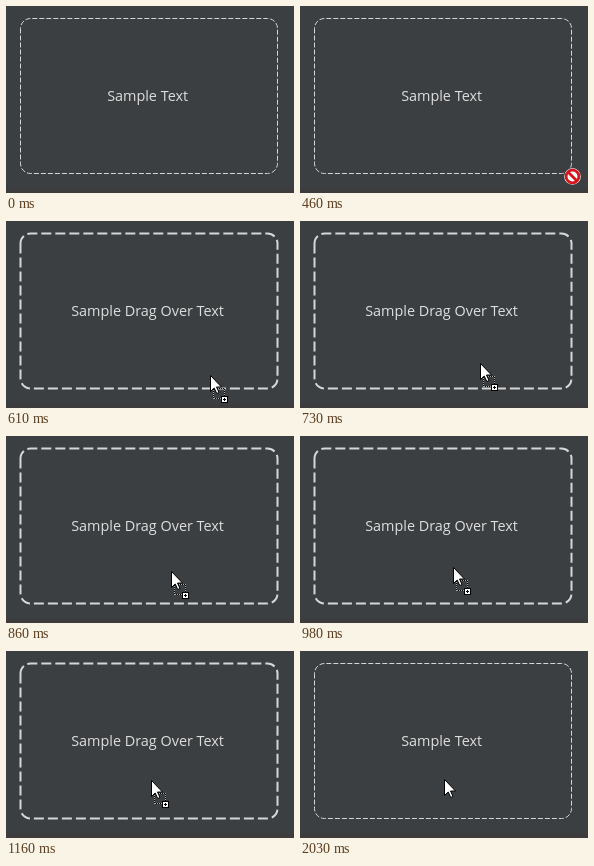
Recreate the animation shown at these times as an HTML page. Size 288 px wide and 187 px high, loop 2530 ms.

```html
<!DOCTYPE html>
<html lang="en">
<head>
<meta charset="utf-8">
<title>Drop zone</title>
<style>
  html, body { margin: 0; width: 100%; height: 100%; overflow: hidden; background: #3c3f41; }
  svg { display: block; width: 288px; height: 187px; }
  text { font: 14.4px "Open Sans", "Noto Sans", sans-serif; fill: #dedede; text-anchor: middle; }
  .zone { fill: none; stroke: #d6d6d6; }
  .hidden { display: none; }
</style>
</head>
<body>
<svg viewBox="0 0 288 187">
  <defs>
    <path id="frame" d="M14.5 22.5 V157.5 a10 10 0 0 0 10 10 H261.5 a10 10 0 0 0 10 -10 V22.5 a10 10 0 0 0 -10 -10 H24.5 a10 10 0 0 0 -10 10 Z"/>
    <path id="arrow" fill="#fff" stroke="#000" d="M.5 .5 V16.5 L4.2 13 L6.8 18.5 L9 17.5 L6.5 12 H11.5 Z"/>
  </defs>

  <rect width="288" height="187" fill="#3c3f41"/>
  <rect y="183" width="288" height="4" fill="#3d3b3c"/>

  <g id="idle">
    <use href="#frame" class="zone" stroke-dasharray="5 2"/>
    <text x="141.6" y="95">Sample Text</text>
  </g>
  <g id="over">
    <use href="#frame" class="zone" stroke-width="2" stroke-dasharray="10 4"/>
    <text x="141.6" y="95">Sample Drag Over Text</text>
  </g>

  <g id="cursor">
    <g id="blocked">
      <circle cx=".5" cy=".5" r="8.3" fill="#fff"/>
      <g fill="none" stroke="#d8121a" stroke-width="2.8">
        <circle cx=".5" cy=".5" r="6.4"/>
        <path d="M-4 -4 L5 5"/>
      </g>
    </g>
    <g id="drag">
      <g fill="none" stroke-dasharray="1 1">
        <path stroke="#000" d="M4 14.5 H16 M15.5 15 V25 M4 24.5 H16 M4.5 15 V25"/>
        <path stroke="#a8a8a8" stroke-dashoffset="1" d="M4 14.5 H16 M15.5 15 V25 M4 24.5 H16 M4.5 15 V25"/>
      </g>
      <rect x="12.5" y="22.5" width="6" height="6" fill="#fff" stroke="#000"/>
      <path d="M14 25.5 H17 M15.5 24 V27" stroke="#000"/>
      <use href="#arrow" x="1" y="1"/>
    </g>
    <use id="plain" href="#arrow"/>
  </g>
</svg>
<script>
  const LOOP = 2530, ENTER = 460, OVER = 490, REST = 1160, DROP = 2030;
  const $ = id => document.getElementById(id);
  const show = (id, on) => $(id).classList.toggle("hidden", !on);

  // Pointer path: time, position, velocity in px per ms
  const path = [
    { t: 460,  x: 272, y: 170, vx: -.65, vy: -.12 },
    { t: 610,  x: 203, y: 153, vx: -.29, vy: -.11 },
    { t: 730,  x: 179, y: 141, vx: -.14, vy: -.07 },
    { t: 980,  x: 152, y: 130, vx: -.07, vy: -.022 },
    { t: 1160, x: 144, y: 128, vx: -.02, vy: -.01 }
  ];

  function hermite(p0, v0, p1, v1, d, u) {
    const w = 1 - u;
    return w * w * ((1 + 2 * u) * p0 + u * d * v0)
         + u * u * ((3 - 2 * u) * p1 - w * d * v1);
  }

  function pointer(t) {
    const i = Math.max(1, path.findIndex(p => p.t >= t));
    const a = path[i - 1], b = path[i], d = b.t - a.t, u = (t - a.t) / d;
    return [
      Math.round(hermite(a.x, a.vx, b.x, b.vx, d, u)),
      Math.round(hermite(a.y, a.vy, b.y, b.vy, d, u))
    ];
  }

  // The pointer is sampled every 30 ms
  function sampled(t) {
    const start = t < 980 ? ENTER : 980;
    const s = start + Math.floor((t - start) / 30) * 30;
    return Math.min(REST, Math.max(ENTER, s));
  }

  function draw(t) {
    const over = t >= OVER && t < DROP;
    show("idle", !over);
    show("over", over);
    show("blocked", t >= ENTER && t < OVER);
    show("drag", over);
    show("plain", t >= DROP);
    $("cursor").setAttribute("transform", `translate(${pointer(sampled(t))})`);
  }

  const begin = performance.now();
  function tick() {
    draw((performance.now() - begin) % LOOP);
    requestAnimationFrame(tick);
  }
  tick();
</script>
</body>
</html>
```
